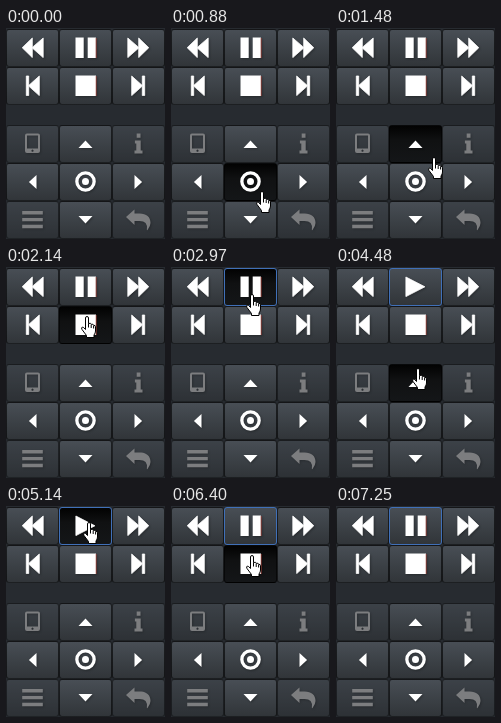
An HTML page that plays this animation: 159 px wide and 211 px high, repeating every 8.37 s.

```html
<!DOCTYPE html>
<html lang="en">
<head>
<meta charset="utf-8">
<title>Remote control</title>
<style>
html, body { margin: 0; width: 159px; height: 211px; overflow: hidden; background: #272b30; }
.key {
  position: absolute; box-sizing: border-box; width: 53px; height: 38px;
  border: 1px solid rgba(0,0,0,.6); border-radius: 3px;
  background: linear-gradient(#484e55, #3a3f44 60%, #313539);
}
.key.hover { background: linear-gradient(#020202, #101112 40%, #141618); }
.key.focus { border-color: #4070b8; }
.key.off { opacity: .65; }
.key svg {
  display: block; width: 51px; height: 36px; fill: #fff; fill-rule: evenodd;
  filter: drop-shadow(1px 1px 1px rgba(0,0,0,.3));
}
.key.off svg { fill: #aaa; }
.round { stroke: #fff; stroke-width: .8; stroke-linejoin: round; }
.fringe { stroke: #a04038; stroke-width: .8; }
#pointer { position: absolute; left: 0; top: 0; fill: #fff; stroke: #000; }
</style>
</head>
<body>
<svg id="pointer" width="159" height="211">
  <g id="hand">
    <path d="M4.5 13.5V2Q4.5 .5 6 .5T7.5 2V7.5q2.5-.8 2.8.8 2-.6 2.4 1 1.8-.2 1.8 1.5V15q0 2-1.5 4v2.5H5.5v-2L1 13.5q-1-1.8.3-2.4 1-.4 3.2 2.4z"/>
    <path fill="none" d="M7.5 7.5v4M10.2 8.5V12M12.6 9.5v3"/>
  </g>
  <path id="arrow" d="M.5 .5V16l3.6-3.4L6.5 18 9 17 6.6 11.6h5z"/>
</svg>
<script>
const path = (d, more = '') => `<path d="${d}" ${more}/>`;
const round = d => path(d, 'class="round"');
const turn = (icon, how) => `<g transform="${how}">${icon}</g>`;
const disc = r => `M${-r}-.5a${r} ${r} 0 1 0 ${2 * r} 0a${r} ${r} 0 1 0 ${-2 * r} 0z`;
const fringe = path('M10.7-10V10', 'class="fringe"');

const rewind = round('M-10.3-.3L-.2-10V-.6L10.7-10V9.6L-.2 0V9.6z');
const previous = round('M-6.2-10h2.4v9.5L6.8-10V9.6L-3.8 .1v9.5h-2.4z');
const pause = path('M-10-10.5h8.2V10H-10zM2.2-10.5h8.2V10H2.2z') + fringe;
const play = round('M-9.6-10L9.4-.2-9.6 9.6z');
const stop = path('M-10-10.5h20.5V10H-10z') + fringe;
const tablet = path('M-5.5-10.5h11q2 0 2 2v15.5q0 2-2 2h-11q-2 0-2-2V-8.5q0-2 2-2zM-5.5-8.5V4.5h11v-13zM0 5.6a1.1 1.1 0 1 0 .01 0z');
const caret = path('M-7 4L0-3.6 7 4z');
const info = path('M-3.6-3.5H2.2v10H4v3h-8v-3h1.8v-7h-1.4zM-1.8-10.5h3.8v4.2h-3.8z');
const ring = path(disc(10.3) + disc(7) + disc(3.5));
const bars = path([-9, -2.1, 4.8].map(y => `M-10.3 ${y}h20.6v3.4h-20.6z`).join(''));
const reply = path('M-12.5-3L-4-10.5v4H1C8-6.5 12-3 12 3q0 3-3 7-1 .5-.6-.6Q9.5 1 1 1h-5v4z');
const mirror = 'scale(-1 1)';

const icons = [
  rewind, pause, turn(rewind, mirror),
  previous, stop, turn(previous, mirror),
  tablet, caret, info,
  turn(caret, 'rotate(-90)'), ring, turn(caret, 'rotate(90)'),
  bars, turn(caret, 'rotate(180)'), reply
];
const PAUSE = 1, STOP = 4, UP = 7, OK = 10, RIGHT = 11, MENU = 12, DOWN = 13, BACK = 14, NONE = -1;
const disabled = [6, 8, MENU, BACK];
const rows = [1, 39, 97, 135, 173];

const keys = icons.map((icon, i) => {
  const key = document.createElement('div');
  key.className = 'key' + (disabled.includes(i) ? ' off' : '');
  key.style.left = i % 3 * 53 + 'px';
  key.style.top = rows[i / 3 | 0] + 'px';
  key.innerHTML = `<svg viewBox="-25.5 -18 51 36">${icon}</svg>`;
  pointer.before(key);
  return key;
});
const mainIcon = keys[PAUSE].firstChild;

// The pointer jumps between these: time, x, y, hovered key
const moves = [
  [460, 36, 197, MENU], [580, 43, 187, MENU], [730, 66, 183, DOWN],
  [880, 85, 163, OK], [1040, 111, 161, RIGHT], [1190, 120, 152, RIGHT],
  [1320, 117, 145, RIGHT], [1480, 92, 129, UP], [1630, 86, 116, UP],
  [1750, 80, 103, UP], [1870, 77, 92, UP], [2020, 75, 67, STOP],
  [2140, 75, 49, STOP], [2300, 75, 36, PAUSE], [2440, 75, 31, PAUSE],
  [2570, 75, 27, PAUSE], [3550, 75, 40, STOP], [3680, 75, 48, STOP],
  [3820, 75, 64, STOP], [3940, 76, 85, NONE], [4060, 76, 103, UP],
  [4360, 76, 102, UP], [4480, 76, 101, UP], [4600, 76, 100, UP],
  [4750, 76, 76, NONE], [4870, 76, 50, STOP], [5020, 76, 30, PAUSE],
  [5140, 77, 16, PAUSE], [6270, 76, 38, STOP], [6400, 75, 49, STOP],
  [6550, 80, 87, NONE], [6710, 88, 138, UP], [6860, 115, 172, BACK],
  [6980, 132, 186, BACK], [7130, 139, 197, BACK]
];
const LOOP = 8370, LEAVE = 7250;
let playing;

function draw(now) {
  const t = now % LOOP;
  const move = t < LEAVE && moves.findLast(m => m[0] <= t);
  const [, x, y, hovered] = move || [0, 0, 0, NONE];
  keys.forEach((key, i) => key.classList.toggle('hover', i === hovered));
  keys[PAUSE].classList.toggle('focus', t >= 2970);

  const paused = t >= 3120 && t < 5840;
  if (paused !== playing) {
    playing = paused;
    mainIcon.innerHTML = paused ? play : pause;
  }

  const shape = move && (t >= 6550 && t < 6710 ? arrow : hand);
  for (const p of [hand, arrow]) {
    p.style.display = p === shape ? '' : 'none';
    p.setAttribute('transform', `translate(${x} ${y})`);
  }
  requestAnimationFrame(draw);
}
const start = performance.now();
requestAnimationFrame(() => draw(performance.now() - start));
</script>
</body>
</html>
```
